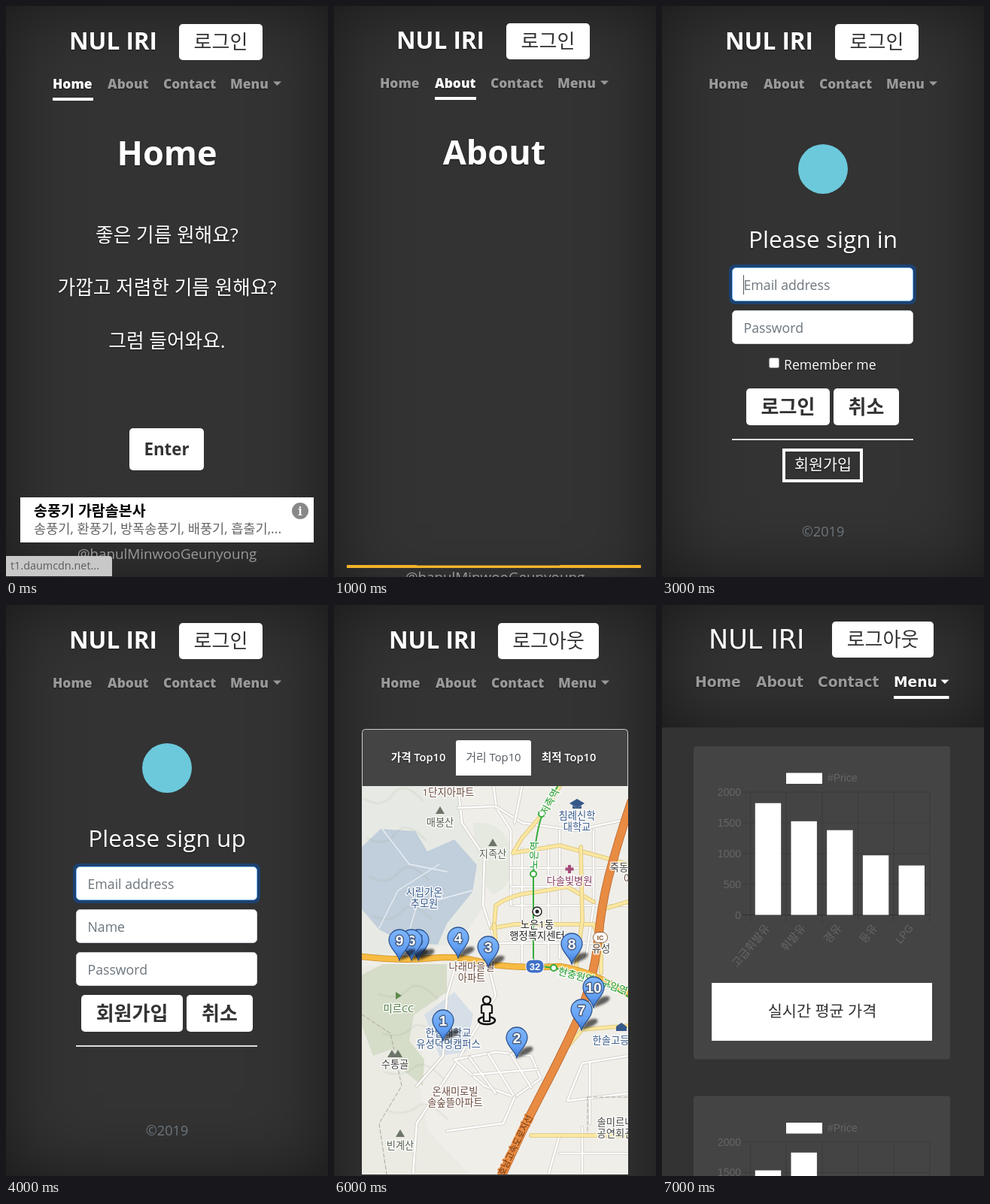
An HTML page with a canvas that plays this animation: 428 by 760 pixels, repeating every 8 s.

```html
<!DOCTYPE html>
<html lang="ko">
<head>
<meta charset="utf-8">
<title>Fuel finder walkthrough</title>
<style>
html, body { margin: 0; width: 100%; height: 100%; overflow: hidden; background: #333; }
canvas { display: block; width: 428px; height: 760px; }
</style>
</head>
<body>
<canvas id="stage"></canvas>
<script>
const W = 428, H = 760, SLIDE = 1000;
const SANS = '"Open Sans", "Noto Sans CJK KR", "Noto Sans CJK JP", sans-serif';
const WIDE = '"DejaVu Sans", "Noto Sans CJK KR", sans-serif';
const ARIAL = '"Liberation Sans", "Noto Sans CJK KR", sans-serif';
const BRAND = 'NUL IRI', INK = '#333', MUTED = '#6c757d';
const canvas = document.getElementById('stage');
const ctx = canvas.getContext('2d');
const dpr = window.devicePixelRatio || 1;
canvas.width = W * dpr;
canvas.height = H * dpr;

// y is the middle of the capital letters
function text(str, x, y, size, o = {}) {
  const { color = '#fff', weight = 400, align = 'left', font = SANS, shadow = color === '#fff', halo } = o;
  ctx.save();
  ctx.font = `${weight} ${size}px ${font}`;
  ctx.textAlign = align;
  const base = y + size * 0.36;
  if (halo) {
    ctx.strokeStyle = halo;
    ctx.lineWidth = 3;
    ctx.lineJoin = 'round';
    ctx.strokeText(str, x, base);
  }
  if (shadow) {
    ctx.shadowColor = 'rgba(0,0,0,.5)';
    ctx.shadowBlur = 2 * dpr;
    ctx.shadowOffsetY = dpr;
  }
  ctx.fillStyle = color;
  ctx.fillText(str, x, base);
  ctx.restore();
}

const centered = (str, y, size, o) => text(str, 214, y, size, { align: 'center', ...o });

function rect(x, y, x2, y2, fill) {
  ctx.fillStyle = fill;
  ctx.fillRect(x, y, x2 - x, y2 - y);
}

function box(x, y, x2, y2, r, fill, stroke) {
  ctx.beginPath();
  ctx.roundRect(x, y, x2 - x, y2 - y, r);
  if (fill) { ctx.fillStyle = fill; ctx.fill(); }
  if (stroke) { ctx.strokeStyle = stroke; ctx.lineWidth = 1; ctx.stroke(); }
}

function disc(x, y, r, fill, stroke, width = 1) {
  ctx.beginPath();
  ctx.arc(x, y, r, 0, Math.PI * 2);
  if (fill) { ctx.fillStyle = fill; ctx.fill(); }
  if (stroke) { ctx.strokeStyle = stroke; ctx.lineWidth = width; ctx.stroke(); }
}

function rotated(x, y, deg, draw) {
  ctx.save();
  ctx.translate(x, y);
  ctx.rotate(deg * Math.PI / 180);
  draw();
  ctx.restore();
}

// Dark page with an inset shadow along the edges
function page(height = H) {
  rect(0, 0, W, H, '#333');
  ctx.save();
  ctx.beginPath();
  ctx.rect(0, 0, W, height);
  ctx.clip();
  ctx.shadowColor = 'rgba(0,0,0,.5)';
  ctx.shadowBlur = 92 * dpr;
  ctx.fillStyle = '#000';
  ctx.beginPath();
  ctx.rect(-200, -200, W + 400, height + 400);
  ctx.rect(0, 0, W, height);
  ctx.fill('evenodd');
  ctx.restore();
}

function button(x, y, x2, y2, label, size = 26, weight = 700) {
  box(x, y, x2, y2, 5, '#fff');
  text(label, (x + x2) / 2, (y + y2) / 2, size, { color: INK, weight, align: 'center' });
}

function outlined(y, label) {
  ctx.strokeStyle = '#fff';
  ctx.lineWidth = 4;
  ctx.strokeRect(162, y + 2, 103, 41);
  centered(label, y + 22, 20.7);
}

function field(x, y, x2, y2, label, o = {}) {
  const { color = MUTED, focus, fill = '#fff', size = 17.7 } = o;
  if (focus) box(x - 4, y - 4, x2 + 4, y2 + 4, 8, '#1c4270');
  box(x + .5, y + .5, x2 - .5, y2 - .5, 5, fill, focus ? '#80bdff' : '#ced4da');
  text(label, x + 15.5, y + 23.5, size, { color });
}

const rule = (y, height = 2) => rect(93, y, 334, y + height, '#ddd');

function nav(xs, y, size, font, active, caretX) {
  const weight = font === SANS ? 800 : 700;
  ['Home', 'About', 'Contact', 'Menu'].forEach((label, i) => {
    const on = i === active;
    const color = on ? '#fff' : '#999';
    const end = i < 3 ? xs[i + 1] - 19 : caretX + 11;
    text(label, xs[i], y, size, { color, weight, font, shadow: true });
    if (on) rect(xs[i], y + 18.5, end, y + 22.5, '#fff');
    if (i < 3) return;
    ctx.fillStyle = color;
    ctx.beginPath();
    ctx.moveTo(caretX, y - 3);
    ctx.lineTo(caretX + 11, y - 3);
    ctx.lineTo(caretX + 5.5, y + 2.5);
    ctx.fill();
  });
}

function header(active, loggedIn) {
  text(BRAND, loggedIn ? 73 : 84, 47, 31.5, { weight: 700 });
  if (loggedIn) button(218, 24, 352, 72, '로그아웃', 26, 400);
  else button(230, 24, 341, 72, '로그인', 26, 400);
  nav([62, 135, 209, 298], 103.5, 17.4, SANS, active, 355);
}

const title = str => centered(str, 196, 45, { weight: 700 });
const footer = y => centered('@hanulMinwooGeunyoung', y, 18.8, { color: '#999' });
const logo = y => disc(214, y, 33, '#6cc9dc');

function home() {
  page();
  header(0);
  title('Home');
  centered('좋은 기름 원해요?', 305, 25.7);
  centered('가깝고 저렴한 기름 원해요?', 375, 25.7);
  centered('그럼 들어와요.', 446, 25.7);
  button(164, 562, 263, 618, 'Enter', 22.3);
  rect(19, 654, 409, 714, '#fff');
  text('송풍기 가람솔본사', 37, 672, 19.5, { color: '#000', weight: 700 });
  text('송풍기, 환풍기, 방폭송풍기, 배풍기, 흡출기,...', 37, 696, 17.6, { color: '#666' });
  disc(391, 672, 11, '#888');
  text('i', 391, 672, 16, { weight: 700, align: 'center', font: '"Noto Serif", serif', shadow: false });
  footer(729);
  box(-5, 732, 141, 759, [0, 4, 0, 0], '#c8c8c8');
  text('t1.daumcdn.net...', 6, 745, 14.4, { color: '#5c5c5c' });
}

// Pages whose top sits one pixel up and left, with a banner edge at the bottom
function shifted(active, name) {
  page(800);
  ctx.save();
  ctx.translate(-1, -1);
  header(active);
  title(name);
  ctx.restore();
  rect(17, 744, 408, 748, '#f2b32c');
  rect(110, 744, 300, 745, '#8a6a28');
  footer(760);
}

function about() {
  shifted(1, 'About');
}

function contact() {
  shifted(-1, 'Contact');
  field(36, 249, 390, 295, '제목을 입력해주세요', { size: 20.7 });
  field(36, 306, 390, 665, '문의사항', { size: 20.7 });
  button(130, 677, 295, 733, '메일 보내기');
}

function signIn() {
  page();
  header(-1);
  logo(217);
  centered('Please sign in', 311, 31.5);
  field(93, 348, 334, 393, 'Email address', { focus: true });
  rect(108, 358, 109, 384, '#555');
  field(93, 405, 334, 450, 'Password');
  box(142.5, 468.5, 155.5, 481.5, 2, '#fff', '#999');
  text('Remember me', 162, 478, 17.7);
  button(112, 509, 223, 558, '로그인');
  button(228, 509, 315, 558, '취소');
  rule(576);
  outlined(589, '회원가입');
  centered('©2019', 699, 18.2, { color: MUTED });
}

function signUp() {
  page();
  header(-1);
  logo(217);
  centered('Please sign up', 311, 31.5);
  field(93, 348, 334, 393, 'Email address', { focus: true });
  field(93, 405, 334, 450, 'Name');
  field(93, 462, 334, 507, 'Password');
  button(100, 519, 235, 568, '회원가입');
  button(240, 519, 328, 568, '취소');
  rule(586);
  centered('©2019', 699, 18.2, { color: MUTED });
}

function myPage() {
  page();
  header(3, true);
  button(93, 164, 334, 218, '자동차 등록');
  logo(273);
  centered('[5678]님의 마이페이지', 360, 25, { weight: 500 });
  field(93, 392, 334, 437, 'i@a.test', { focus: true, fill: '#e9ecef', color: '#495057' });
  field(93, 449, 334, 494, '5678', { color: '#495057' });
  field(93, 506, 334, 551, 'Password');
  button(100, 563, 235, 612, '수정완료');
  button(240, 563, 328, 612, '정정');
  rule(631, 1);
  outlined(642, '탈퇴하기');
  centered('© 2019', 752, 18.2, { color: MUTED });
}

// Path strings keep the map geometry short
const area = (d, fill) => { ctx.fillStyle = fill; ctx.fill(new Path2D(d)); };

function road(d, width, fill, edge) {
  const path = new Path2D(d);
  ctx.lineJoin = ctx.lineCap = 'round';
  if (edge) {
    ctx.strokeStyle = edge;
    ctx.lineWidth = width + 1.6;
    ctx.stroke(path);
  }
  ctx.strokeStyle = fill;
  ctx.lineWidth = width;
  ctx.stroke(path);
}

function place(lines, x, y, color = '#444', gap = 15.5, size = 13.3) {
  lines.split('/').forEach((line, i) =>
    text(line, x, y + i * gap, size, { color, align: 'center', halo: 'rgba(255,255,255,.85)', weight: 500 }));
}

function peak(x, y) {
  area(`M${x - 6} ${y + 5}L${x} ${y - 5}L${x + 6} ${y + 5}Z`, '#6d7468');
}

function pin(x, y, n) {
  const tip = y + 27;
  ctx.save();
  ctx.filter = 'blur(1.5px)';
  area(`M${x} ${tip}Q${x + 6} ${tip - 17} ${x + 20} ${tip - 15}Q${x + 27} ${tip - 9} ${x} ${tip}Z`, 'rgba(0,0,0,.6)');
  ctx.restore();
  const shape = new Path2D(`M${x} ${tip}C${x - 2} ${y + 17} ${x - 14} ${y + 11} ${x - 14} ${y}A14 14 0 0 1 ${x + 14} ${y}C${x + 14} ${y + 11} ${x + 2} ${y + 17} ${x} ${tip}Z`);
  const shade = ctx.createLinearGradient(x, y - 14, x, tip);
  shade.addColorStop(0, '#7fb6fb');
  shade.addColorStop(.65, '#629ff2');
  shade.addColorStop(1, '#3a76cc');
  ctx.fillStyle = shade;
  ctx.fill(shape);
  ctx.strokeStyle = '#2c5490';
  ctx.lineWidth = 1.3;
  ctx.stroke(shape);
  text(n, x, y, 19, { weight: 700, align: 'center', font: ARIAL, halo: '#4a6285', shadow: false });
}

function person(x, y) {
  ctx.beginPath();
  ctx.ellipse(x, y + 13, 11, 5, 0, 0, Math.PI * 2);
  ctx.strokeStyle = '#111';
  ctx.lineWidth = 2.5;
  ctx.stroke();
  const body = new Path2D(`M${x - 4} ${y - 8}H${x + 4}Q${x + 7} ${y - 8} ${x + 7} ${y - 5}V${y + 3}H${x + 4}V${y + 14}H${x - 4}V${y + 3}H${x - 7}V${y - 5}Q${x - 7} ${y - 8} ${x - 4} ${y - 8}Z`);
  ctx.fillStyle = '#f4f2ee';
  ctx.fill(body);
  ctx.lineWidth = 2.2;
  ctx.stroke(body);
  disc(x, y - 14, 5, '#f4f2ee', '#111', 2.4);
}

function terrain() {
  rect(37, 241, 391, 758, '#f0eee9');
  area('M37 241H160L176 300L192 330L200 400L165 450L37 470Z', '#e7eae4');
  area('M37 480H150L135 540L110 620L125 700L180 758H37Z', '#ebebe4');
  area('M185 290Q225 285 238 330Q240 375 212 385Q190 370 185 290Z', '#e6e9e0');
  area('M37 322L62 298L108 301L124 328L160 312L190 346L184 382L150 424L138 452L95 450L60 432L37 405Z', '#c1cedb');
  area('M37 492L65 478H150V515L106 546L100 580L120 605L118 640L95 622L80 590L52 600L37 560Z', '#d5dcc8');
  area('M120 545L160 515L185 545L175 595L140 600Z', '#d6dfe7');
  for (let i = 0; i < 9; i++) {
    road(`M${40 + i * 4} ${258 + i * 52}q24 ${14 - i} 38 -6t40 ${8 + i}`, 3, 'rgba(150,165,140,.12)');
  }
}

function streets() {
  const minor = [
    'M165 241L170 290L200 335L198 400L215 450', 'M212 241L216 270L235 300V400',
    'M165 270L215 268L250 290L320 300L391 285', 'M240 290L250 241', 'M300 300V470',
    'M235 350H391M235 375H330M240 400H391M215 450H345M250 325V475M285 320V475',
    'M345 300V400L335 470', 'M165 468L150 520L145 600L110 640', 'M205 478L215 520L185 570L165 605L110 690L105 758',
    'M160 605L215 595L262 600L275 630L240 655L200 640Z', 'M180 602L215 650M205 597L240 655M235 598L262 642M185 625L270 618',
    'M240 655L225 690L150 700', 'M391 600L330 610L310 660L391 650M340 610V690', 'M285 758L300 705M330 695V758M300 730H391'
  ];
  minor.forEach(d => road(d, 2.6, '#fff', '#cfcbc2'));
  road('M64 298L100 345L150 355M60 430L85 380L140 345M95 450L110 400L184 380', 1.3, '#e9eff5');
  ctx.setLineDash([5, 3]);
  road('M37 545L75 570L90 640L60 690L70 758M337 655H391M337 655V705H365', 1, '#aaa79b');
  ctx.setLineDash([]);
  const main = [
    'M213 425L215 400Q235 385 270 382L310 375L345 395', 'M210 430L240 425H345L355 450',
    'M300 241L280 275L250 310L238 330L300 320L391 345', 'M328 322L330 420L322 480',
    'M205 478L215 450L213 425', 'M391 560L330 565L300 600', 'M262 706H391', 'M391 395L357 405L355 450V490'
  ];
  main.forEach(d => road(d, 4, '#fbe7a0', '#d9c377'));
  road('M395 262Q378 312 365 362Q355 402 351 446Q345 502 322 556Q300 604 273 655Q246 707 222 762', 10, '#e88b43', '#b9662c');
  road('M37 468Q90 474 130 470T205 478Q250 484 300 481Q345 488 391 518', 7, '#f7bb42', '#c98f24');
  road('M300 236L277 278Q266 310 265 358V470Q268 482 293 483Q340 492 391 521', 2, '#35ad3f');
  [[276, 278], [265, 358], [292, 483]].forEach(([x, y]) => disc(x, y, 4, '#fff', '#35ad3f', 2));
}

function labels() {
  const brown = '#6a4a3c', blue = '#36598a', green = '#1d9a2b';
  [[141, 273], [211, 316], [77, 597], [85, 597], [88, 703]].forEach(([x, y]) => peak(x, y));
  place('1단지아파트', 152, 249, brown);
  place('매봉산', 141, 289, '#56604f');
  place('지족산', 211, 331, '#56604f');
  place('시립가온/추모원', 120, 382, blue);
  area('M313 264L323 258L333 264L323 270ZM317 267V271H329V267L323 270Z', blue);
  place('침례신학/대학교', 323, 280, blue);
  rect(311, 346, 315, 357, '#a34a78');
  rect(307.5, 349.5, 318.5, 353.5, '#a34a78');
  place('다솔빛병원', 313, 367, '#8a3a5e');
  disc(270, 408, 6, '#fff', '#222', 1.5);
  disc(270, 408, 2.5, '#222');
  place('노은1동/행정복지센터', 270, 425, '#222');
  place('죽동', 379, 349);
  place('아', 391, 364, brown);
  place('유성', 355, 457);
  box(344.5, 435.5, 363.5, 449.5, 7, '#fff', '#8a5a2c');
  text('IC', 354, 442.5, 9, { color: '#8a5a2c', weight: 700, align: 'center', font: ARIAL });
  box(255, 472, 279, 490, 8, '#3f6fc6', '#fff');
  text('32', 267, 481, 13, { weight: 700, align: 'center', font: ARIAL, shadow: false });
  place('나래마을빌/아파트', 183, 481, brown);
  area('M82 515L90 520L82 525Z', '#5d8a4c');
  place('미르CC', 86, 537, '#4f7a42');
  place('한밭대학교/유성덕명캠퍼스', 152, 569, blue, 15);
  place('수통골', 81, 611);
  place('온새미로빌/솔숲뜰아파트', 161, 647, brown);
  place('빈계산', 88, 719, '#56604f');
  place('솔미르네/공연회관', 374, 688);
  area('M375 567V561L382 556L389 561V567Z', blue);
  place('한솔고등', 368, 579, blue);
  rotated(287, 262, -62, () => place('지족역', 0, 0, green));
  rotated(266, 333, -88, () => place('노은역', 0, 0, green));
  rotated(322, 493, 14, () => place('현충원역', 0, 0, green));
  rotated(373, 508, 20, () => place('구암역', 0, 0, green));
  rotated(241, 719, -64, () =>
    text('호남고속도로지선', 0, 0, 12, { color: '#6b3410', align: 'center', halo: '#e88b43' }));
}

function mapPage() {
  page(850);
  header(-1, true);
  box(37.5, 165.5, 390.5, 246, [4, 4, 0, 0], '#444', '#ccc');
  text('가격 Top10', 112, 203, 14.6, { align: 'center', weight: 600 });
  box(162, 180, 262, 227, [3, 3, 0, 0], '#fff');
  text('거리 Top10', 212, 203, 14.8, { align: 'center', color: '#555b61' });
  text('최적 Top10', 312, 203, 14.6, { align: 'center', weight: 600 });
  ctx.save();
  ctx.beginPath();
  ctx.rect(37, 241, 354, 517);
  ctx.clip();
  terrain();
  streets();
  labels();
  [[112, 446, 5], [103, 446, 6], [87, 446, 9], [165, 443, 4], [205, 455, 3], [316, 451, 8],
   [345, 509, 10], [329, 539, 7], [145, 553, 1], [243, 576, 2]].forEach(p => pin(...p));
  person(203, 540);
  ctx.restore();
}

function chart(top, prices) {
  const grey = '#666', y0 = top + 224.5, scale = 163.5 / 2000;
  box(42, top, 383, top + 416.5, 4, '#444');
  rect(165, top + 35.5, 213, top + 50, '#fff');
  text('#Price', 220, top + 42, 14, { color: grey, font: ARIAL });
  for (let v = 0; v <= 2000; v += 500) {
    const y = y0 - v * scale;
    rect(107, y - .5, 356, y + .5, v ? '#3b3b3b' : '#303030');
    text(String(v), 105, y, 14, { color: grey, font: ARIAL, align: 'right' });
  }
  ['고급휘발유', '휘발유', '경유', '등유', 'LPG'].forEach((label, i) => {
    const x = 117 + i * 47.7;
    rect(x, y0 - 163.5, x + 1, y0 + 10, '#3b3b3b');
    rect(x + 6.8, y0 - prices[i] * scale, x + 41.2, y0, '#fff');
    rotated(x + 23, top + 239, -50, () =>
      text(label, 0, 0, i < 4 ? 15 : 14, { color: grey, font: ARIAL, align: 'right' }));
  });
  rect(355.5, y0 - 163.5, 356.5, y0 + 10, '#3b3b3b');
}

function prices() {
  page(163);
  text(BRAND, 62, 45, 35, { font: WIDE });
  button(226, 22, 361, 70, '로그아웃', 26, 400);
  nav([44, 125, 207, 308], 102.5, 18.7, WIDE, 3, 370.5);
  chart(188, [1820, 1525, 1380, 970, 805]);
  rect(66, 503, 359, 580, '#fff');
  text('실시간 평균 가격', 213, 541, 20.8, { color: INK, align: 'center' });
  chart(653.5, [1535, 1825, 1400, 980, 800]);
}

const slides = [home, about, contact, signIn, signUp, myPage, mapPage, prices];
const start = performance.now();
let shown = -1;

function frame() {
  const index = Math.floor((performance.now() - start) / SLIDE) % slides.length;
  if (index !== shown) {
    shown = index;
    ctx.setTransform(dpr, 0, 0, dpr, 0, 0);
    slides[index]();
  }
  requestAnimationFrame(frame);
}

frame();
</script>
</body>
</html>
```
